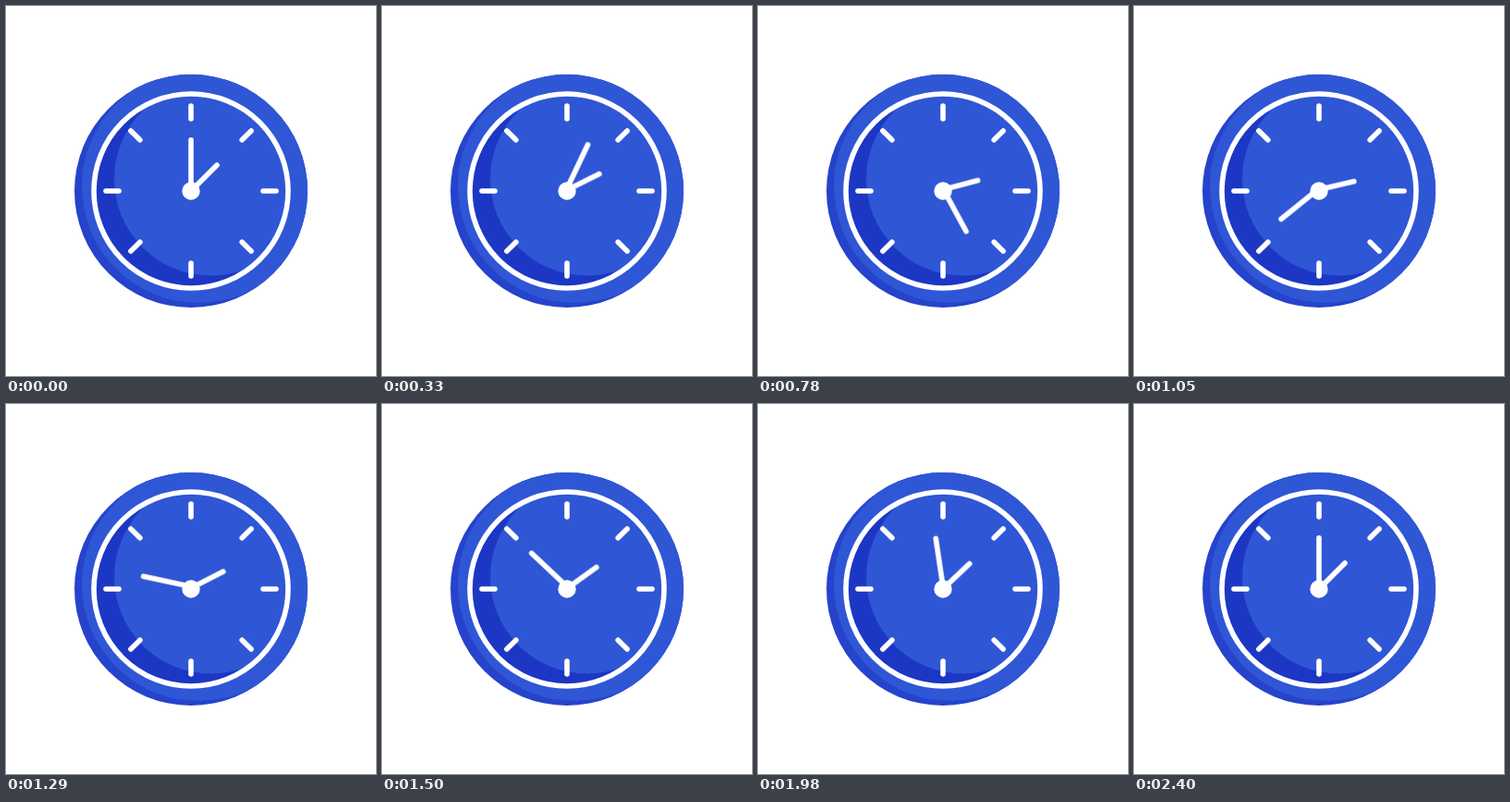
An HTML page without scripts for the animation above (2.46 s loop, 400 by 400 pixels).

```html
<!DOCTYPE html>
<html lang="en">
<head>
<meta charset="utf-8">
<title>Clock</title>
<style>
  html, body { margin: 0; width: 100%; height: 100%; overflow: hidden; background: #fff; }
  svg { display: block; width: 100%; height: 100%; }

  .lit { fill: #2f56d5; }
  .rim-shade { fill: #2543cb; }
  .face-shade { fill: #1c37c4; }
  .white { fill: none; stroke: #fff; stroke-width: 5.6; stroke-linecap: round; }

  .hand { animation: 2460ms infinite; }
  .minute { transform-origin: 200px 197.4px; animation-name: minute; }
  .hour { transform-origin: 202px 198px; animation-name: hour; }

  /* Both hands rest for the final 60 ms of the loop. */
  @keyframes minute {
    0% { transform: rotate(0deg); animation-timing-function: cubic-bezier(.333, 0, .3, 1); }
    97.561%, 100% { transform: rotate(360deg); }
  }
  @keyframes hour {
    0% { transform: rotate(0deg); animation-timing-function: cubic-bezier(.25, 0, .08, 1); }
    47.561% { transform: rotate(32deg); animation-timing-function: cubic-bezier(0, 0, 0, 1); }
    97.561%, 100% { transform: rotate(0deg); }
  }
</style>
</head>
<body>
<svg viewBox="0 0 400 400">
  <defs>
    <clipPath id="rim"><circle cx="200" cy="200" r="126"/></clipPath>
    <clipPath id="face"><circle cx="200" cy="200" r="105"/></clipPath>
    <path id="tick" d="M200 108V122"/>
  </defs>

  <circle class="rim-shade" cx="200" cy="200" r="126"/>
  <circle class="lit" cx="208" cy="195" r="126" clip-path="url(#rim)"/>

  <g clip-path="url(#face)">
    <circle class="face-shade" cx="200" cy="200" r="105"/>
    <circle class="lit" cx="221.5" cy="187" r="104.5"/>
  </g>

  <g class="white">
    <circle cx="200" cy="200" r="105"/>
    <use href="#tick"/>
    <use href="#tick" transform="rotate(45 200 200)"/>
    <use href="#tick" transform="rotate(90 200 200)"/>
    <use href="#tick" transform="rotate(135 200 200)"/>
    <use href="#tick" transform="rotate(180 200 200)"/>
    <use href="#tick" transform="rotate(225 200 200)"/>
    <use href="#tick" transform="rotate(270 200 200)"/>
    <use href="#tick" transform="rotate(315 200 200)"/>
    <path class="hand minute" d="M200 197.4V144.9"/>
    <path class="hand hour" d="M202 198L228 172"/>
  </g>
  <circle cx="200" cy="200" r="9.7" fill="#fff"/>
</svg>
</body>
</html>
```
